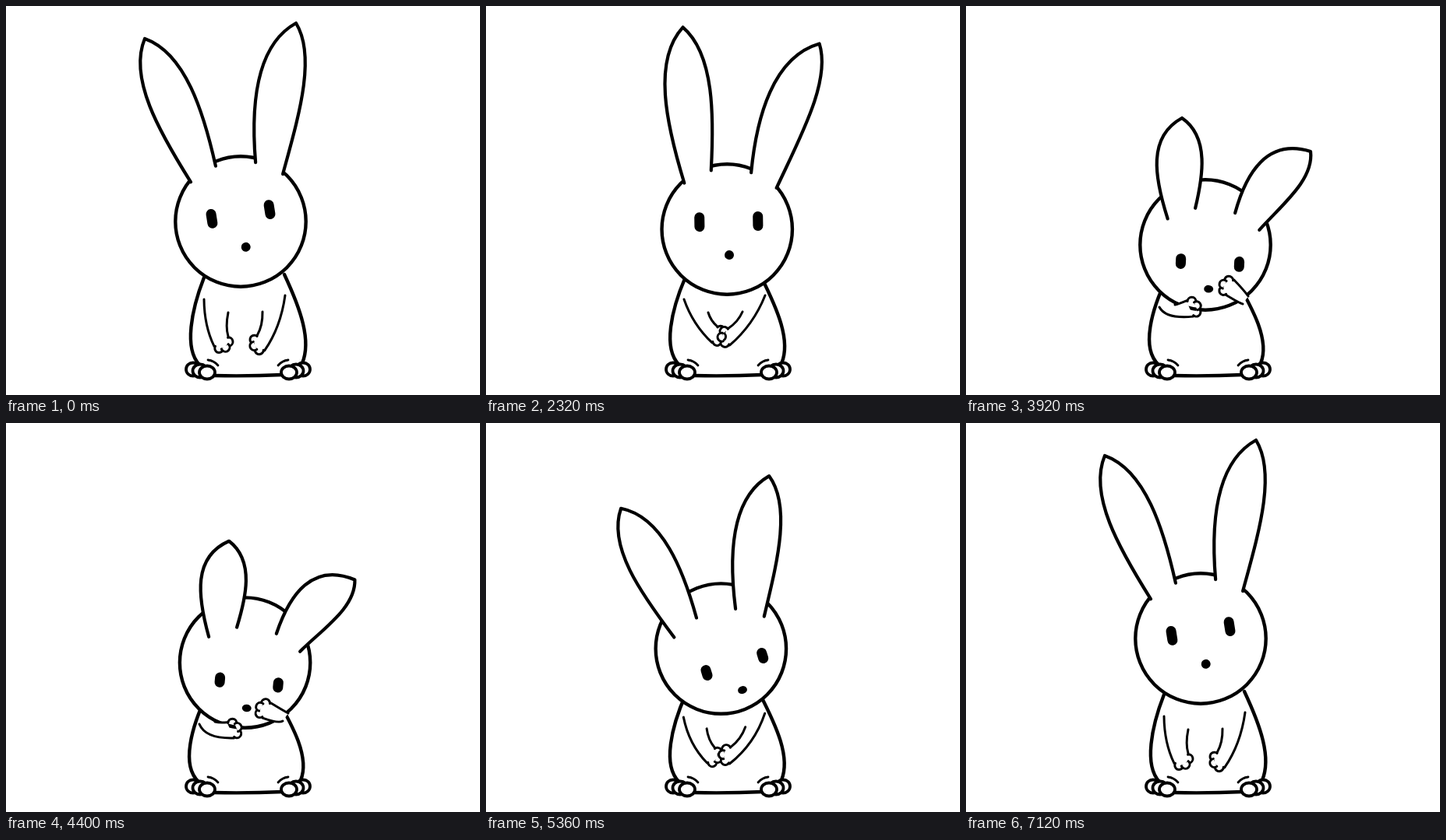
An HTML page with a canvas for the animation above (7200 ms loop, 608 by 500 pixels).

```html
<!DOCTYPE html>
<html lang="en">
<head>
<meta charset="utf-8">
<title>Bunny</title>
<style>
html, body { margin: 0; width: 100%; height: 100%; overflow: hidden; background: #fff; }
canvas { display: block; }
</style>
</head>
<body>
<canvas id="stage" width="608" height="500"></canvas>
<script>
const ctx = document.getElementById('stage').getContext('2d');
const LOOP = 7200, STEP = 80;
const { PI, sin, cos, hypot, atan2, min, max } = Math;
const rad = deg => deg * PI / 180;
const clamp = v => max(0, min(1, v));

// look: middle of the eyes, seen from the head's centre. turn and hand angles in degrees.
const up = {
  head: [301, 277], look: [0, -9.5], turn: -5,
  tips: [[178, 42], [372, 22]], hands: [[276, 431, 55], [327, 433, 155]]
};
const right = {
  head: [315, 287], look: [2.5, -9.5], turn: 8,
  tips: [[302, 24], [482, 74]], hands: [[293, 422, 18], [312, 425, 176]]
};
const rest = {
  ...right, head: [308, 287], look: [2, -10], turn: 2, tips: [[242, 28], [416, 43]]
};
const washA = {
  head: [307, 307], look: [6, 23], turn: 7,
  tips: [[277, 144], [442, 187]], hands: [[287, 389, -23], [339, 362, 207]]
};
const washB = {
  head: [305, 312], look: [2, 34.5], turn: 17,
  tips: [[319, 180], [467, 254]], hands: [[291, 416, -25], [318, 397, 219]]
};
const peek = {
  head: [301, 288], look: [19, 18.5], turn: -16,
  tips: [[159, 103], [353, 50]], hands: [[288, 428, 31], [313, 430, 182]]
};

const smooth = u => u * u * (3 - 2 * u);
const rub = u => (1 - cos(5 * PI * u)) / 2;
const spring = u => 1 - (1 - u) ** 4;

// time, pose, easing on the way there
const keys = [
  [0, up], [1040, up], [1440, right], [2640, rest], [3520, rest],
  [3920, washA], [4960, washB, rub], [5840, peek, spring],
  [6640, peek], [7120, up], [LOOP, up]
];
const blinks = [[240, 560], [5520, 6000]];

function mix(a, b, k) {
  if (typeof a === 'number') return a + (b - a) * k;
  if (Array.isArray(a)) return a.map((v, i) => mix(v, b[i], k));
  return Object.fromEntries(Object.keys(a).map(n => [n, mix(a[n], b[n], k)]));
}

function poseAt(t) {
  const i = keys.findIndex(k => k[0] > t);
  const [t0, from] = keys[i - 1], [t1, to, ease = smooth] = keys[i];
  const pose = mix(from, to, ease((t - t0) / (t1 - t0)));
  // the ears spread and close once after the head has settled
  const flick = 6 * sin(PI * clamp((t - 2640) / 240));
  pose.tips[0][0] -= flick;
  pose.tips[1][0] += flick;
  return pose;
}

function stroke(width, draw, fill) {
  ctx.beginPath();
  draw();
  ctx.lineWidth = width;
  if (fill) ctx.fill();
  ctx.stroke();
}

function cubic(x, y, ...c) {
  ctx.moveTo(x, y);
  ctx.bezierCurveTo(...c);
}

function quad(x, y, ...c) {
  ctx.moveTo(x, y);
  ctx.quadraticCurveTo(...c);
}

function drawBody(headY) {
  const c = clamp((headY - 277) / 25);
  stroke(4.4, () => {
    cubic(254 + 4 * c, 349, 238, 390, 228 - 4 * c, 440, 248 - c, 461);
    cubic(357 - 11 * c, 345 + 6 * c, 378 - 10 * c, 390, 392 - 2 * c, 430, 380 - 2 * c, 459);
    quad(266, 475, 310, 476, 355, 474);
  });
}

function drawFoot(x, side) {
  for (let i = 0; i < 3; i++)
    stroke(3.8, () => ctx.ellipse(x + side * (10 - 9 * i), 467 + 2 * i, 9 + i / 2, 8.5, 0, 0, 7), true);
  stroke(2.8, () => quad(x - side * 9, 455, x - side * 17, 456, x - side * 22, 462));
}

// side is -1 for the left ear, 1 for the right one
function drawEar({ head, look, turn }, [tx, ty], side) {
  const place = rad(turn + 33 * side), slope = rad(turn + 28 * side);
  const bx = head[0] + 78 * sin(place) + .6 * look[0];
  const by = head[1] - 78 * cos(place) + .9 * (look[1] + 10);
  const ax = tx - bx, ay = ty - by, len = hypot(ax, ay);
  const lean = atan2(ax, -ay) * 180 / PI;
  const bend = -4 - .2 * lean;
  // a point at share k of the axis, moved off it sideways
  const at = (k, off) => [bx + k * ax - off * ay / len, by + k * ay + off * ax / len];
  const base = s => [bx + s * 19 * cos(slope), by + s * 19 * sin(slope)];
  const outline = () => {
    ctx.moveTo(...base(-1));
    ctx.bezierCurveTo(...at(.38, bend - 31), ...at(.8, bend - 40), tx, ty);
    ctx.bezierCurveTo(...at(.8, bend + 40), ...at(.38, bend + 31), ...base(1));
  };
  // the fill dips into the head to open its outline
  ctx.beginPath();
  outline();
  ctx.quadraticCurveTo(...mix([bx, by], head, .15), ...base(-1));
  ctx.fill();
  stroke(4.2, outline);
}

function drawFace({ head, look, turn }, shut) {
  const nod = look[1] + 10;
  ctx.save();
  ctx.translate(head[0] + look[0], head[1] + look[1]);
  ctx.rotate(rad(turn - 4));
  for (const side of [-1, 1]) {
    const x = 37.5 * side, half = 6 - .08 * nod;
    if (shut) stroke(4.2, () => quad(x - 18 + 2 * side, -2, x, 11, x + 14 + 2 * side, -2));
    else stroke(13, () => { ctx.moveTo(x, -half); ctx.lineTo(x, half); });
  }
  ctx.beginPath();
  ctx.ellipse(0, 43 - .28 * nod, 6, 6 - .035 * nod, 0, 0, 7);
  ctx.fillStyle = '#000';
  ctx.fill();
  ctx.restore();
}

function drawArm([hx, hy, deg], side, lift) {
  const a = rad(deg);
  const px = side * 11 * sin(a), py = -side * 11 * cos(a);
  const shoulder = side < 0 ? mix([254, 377], [248, 387], lift) : mix([358, 372], [355, 383], lift);
  const pit = side < 0 ? mix([285, 394], [268, 384], lift) : mix([329, 393], [362, 373], lift);
  const line = ([x, y], ex, ey, sag) => {
    const d = sag * hypot(ex - x, ey - y);
    return [x, y, (x + ex) / 2 + side * d, (y + ey) / 2 + .7 * d, ex, ey];
  };
  const outer = line(shoulder, hx + px, hy + py, .1 + .2 * lift);
  const inner = line(pit, hx - px, hy - py, .12);
  ctx.beginPath();
  quad(...outer);
  ctx.lineTo(inner[4], inner[5]);
  ctx.quadraticCurveTo(inner[2], inner[3], inner[0], inner[1]);
  ctx.fill();
  stroke(3, () => { quad(...outer); quad(...inner); });
  for (const i of [-1, 1, 0]) {
    const f = a + i * .9;
    stroke(3, () => ctx.arc(hx + 9.5 * cos(f), hy + 9.5 * sin(f), 5.5, f - 1.8, f + 1.8), true);
  }
}

function draw(t) {
  const p = poseAt(t);
  const shut = blinks.some(([a, b]) => t >= a && t < b);
  const lift = clamp((p.head[1] - 288) / 19);
  const sides = [-1, 1];
  ctx.fillStyle = '#fff';
  ctx.fillRect(0, 0, 608, 500);
  ctx.strokeStyle = '#000';
  ctx.lineCap = ctx.lineJoin = 'round';
  drawBody(p.head[1]);
  drawFoot(250, -1);
  drawFoot(371, 1);
  stroke(4.4, () => ctx.arc(...p.head, 83.7, 0, 7), true);
  sides.forEach((s, i) => drawEar(p, p.tips[i], s));
  drawFace(p, shut);
  sides.forEach((s, i) => drawArm(p.hands[i], s, lift));
}

const start = performance.now();
function tick() {
  const t = (performance.now() - start) % LOOP;
  draw(Math.floor(t / STEP) * STEP);
  requestAnimationFrame(tick);
}
tick();
</script>
</body>
</html>
```
